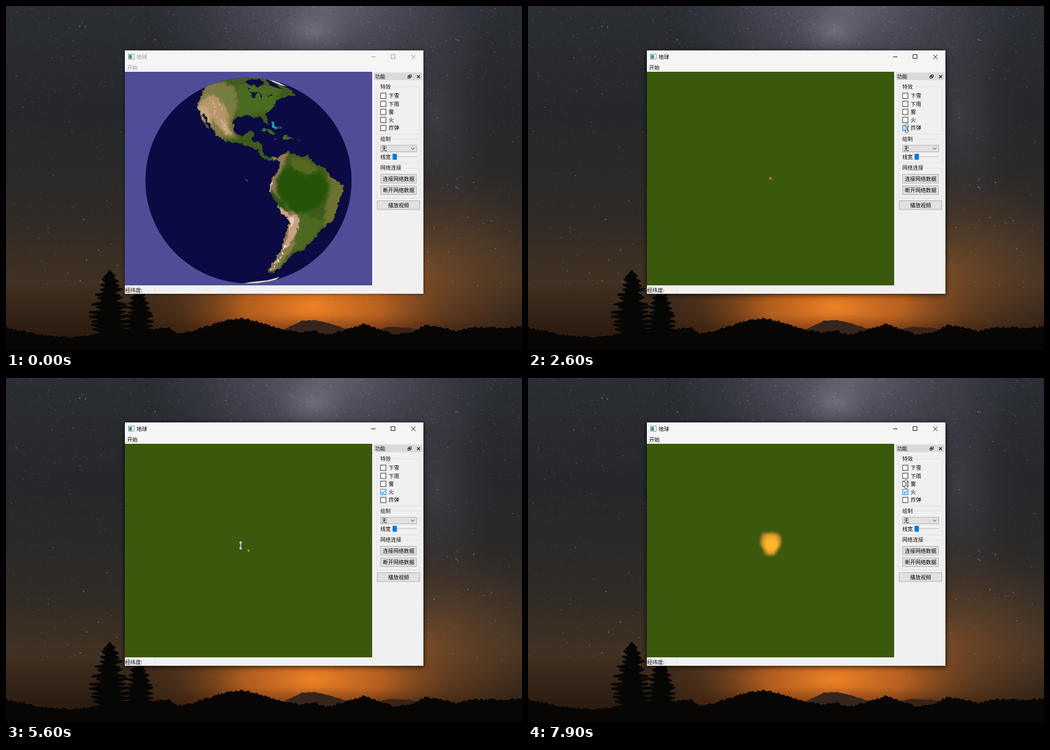
Write an HTML page with a canvas that moves like this. It is 916 px wide and 612 px high and loops after 8 s.

```html
<!DOCTYPE html>
<html lang="zh-CN">
<head>
<meta charset="utf-8">
<title>地球</title>
<style>
html, body { margin: 0; width: 100%; height: 100%; overflow: hidden; background: #222; }
canvas, svg { position: absolute; left: 0; top: 0; width: 916px; height: 612px; }
text { font: 9.33px "Noto Sans CJK SC", "Noto Sans CJK", sans-serif; fill: #111; }
.thin { font-weight: 300; fill: #000; }
.head { font-weight: 300; paint-order: stroke; stroke: #f0f0f0; stroke-width: 5px; }
.mid { text-anchor: middle; }
.btn { fill: #e1e1e1; stroke: #adadad; }
.frame { fill: none; stroke: #dedede; }
.box { fill: #fff; stroke: #333; }
.tick { fill: none; stroke: #0078d7; stroke-width: 1.2; }
.soft { filter: blur(2px); }

.anim { animation: 8s step-end infinite; }
.focus-text { animation-name: focusText; }
.focus-line { animation-name: focusLine; }
.focus-shade { animation-name: focusShade; }
.ground { animation-name: ground; }
.bomb-box { animation-name: bombBox; }
.bomb-tick { animation-name: bombTick; }
.fire-box { animation-name: fireBox; }
.fire-tick { animation-name: fireTick; }
.blast { animation-name: blast; }
.flame { animation-name: flame; }
.cursor { animation-name: cursor; }

@keyframes focusText { 0% { fill: #999 } 23.75%, 100% { fill: #000 } }
@keyframes focusLine { 0% { stroke: #999 } 23.75%, 100% { stroke: #111 } }
@keyframes focusShade { 0% { opacity: 0 } 23.75%, 100% { opacity: .38 } }
@keyframes ground { 0% { opacity: 0 } 32.5%, 100% { opacity: 1 } }
@keyframes bombBox {
  0% { fill: #fff; stroke: #333 }
  26.25% { fill: #fff; stroke: #0078d7 }
  31.25% { fill: #cce4f7; stroke: #0078d7 }
  33.75% { fill: #fff; stroke: #0078d7 }
  48.75% { fill: #cce4f7; stroke: #0078d7 }
  50% { fill: #fff; stroke: #0078d7 }
  52.5%, 100% { fill: #fff; stroke: #333 }
}
@keyframes bombTick { 0% { opacity: 0 } 33.75% { opacity: 1 } 50%, 100% { opacity: 0 } }
@keyframes fireBox {
  0% { fill: #fff; stroke: #333 }
  52.5% { fill: #fff; stroke: #0078d7 }
  55% { fill: #cce4f7; stroke: #0078d7 }
  56.25%, 100% { fill: #fff; stroke: #0078d7 }
}
@keyframes fireTick { 0% { opacity: 0 } 56.25%, 100% { opacity: 1 } }
@keyframes blast {
  0% { opacity: 0; transform: translate(430.5px, 306.5px) scale(.15) }
  32.5% { opacity: .6; transform: translate(430.5px, 306.5px) scale(.15); animation-timing-function: steps(5) }
  38.75% { opacity: .9; transform: translate(430.5px, 305.5px) scale(.28); animation-timing-function: steps(5) }
  45% { opacity: 1; transform: translate(430.8px, 303px) scale(.56); animation-timing-function: steps(4) }
  50%, 100% { opacity: 0; transform: translate(431px, 301.5px) scale(.72) }
}
@keyframes flame {
  0% { opacity: 0; transform: translate(430.5px, 307px) scale(.07) }
  57.5% { opacity: .7; transform: translate(430.5px, 307px) scale(.07); animation-timing-function: steps(10) }
  70% { opacity: .8; transform: translate(430.5px, 307px) scale(.1); animation-timing-function: steps(9) }
  81.25% { opacity: 1; transform: translate(430.6px, 305.6px) scale(.24); animation-timing-function: steps(5) }
  87.5% { opacity: 1; transform: translate(430.8px, 300px) scale(.68); animation-timing-function: steps(9) }
  98.75%, 100% { opacity: 1; transform: translate(431px, 294px) scale(1) }
}
@keyframes cursor {
  0% { opacity: 0; transform: translate(894.5px, 112px) }
  3.75% { opacity: 1; transform: translate(894.5px, 112px); animation-timing-function: steps(4) }
  8.75% { opacity: 1; transform: translate(730px, 160px); animation-timing-function: steps(4) }
  13.75% { opacity: 1; transform: translate(674.5px, 184px) }
  15% { opacity: 1; transform: translate(674.5px, 198px) }
  17.5% { opacity: 1; transform: translate(674.5px, 203px); animation-timing-function: steps(3) }
  21.25% { opacity: 1; transform: translate(675.5px, 224px) }
  26.25% { opacity: 1; transform: translate(674px, 221px); animation-timing-function: steps(2) }
  28.75% { opacity: 1; transform: translate(672.5px, 218px) }
  50% { opacity: 1; transform: translate(672.5px, 218px); animation-timing-function: steps(2) }
  52.5% { opacity: 1; transform: translate(672px, 202px) }
  61.25% { opacity: 1; transform: translate(672px, 202px) }
  62.5% { opacity: 1; transform: translate(630px, 225px); animation-timing-function: steps(2) }
  65% { opacity: 1; transform: translate(493px, 300px) }
  66.25% { opacity: 1; transform: translate(430px, 306px) }
  67.5% { opacity: 1; transform: translate(400px, 306px); animation-timing-function: steps(2) }
  70% { opacity: 1; transform: translate(416.5px, 298px); animation-timing-function: steps(5) }
  76.25% { opacity: 1; transform: translate(453px, 312.5px) }
  87.5% { opacity: 1; transform: translate(453px, 312.5px); animation-timing-function: steps(7) }
  96.25%, 100% { opacity: 1; transform: translate(671px, 189px) }
}
</style>
</head>
<body>
<canvas id="sky" width="916" height="612"></canvas>
<svg viewBox="0 0 916 612">
  <defs>
    <filter id="rough" x="-5%" y="-5%" width="110%" height="110%" color-interpolation-filters="sRGB">
      <feTurbulence type="fractalNoise" baseFrequency=".13" numOctaves="3" seed="4"/>
      <feDisplacementMap in="SourceGraphic" scale="9" xChannelSelector="R" yChannelSelector="G"/>
    </filter>
    <clipPath id="view"><rect x="211" y="117" width="439" height="380"/></clipPath>
    <clipPath id="disc"><circle cx="430.5" cy="310.5" r="183"/></clipPath>
    <path id="north" d="M354 141 375 132 400 126 450 125 480 133 495 143 507 151 514 160 503 158 497 163 488 163 480 168 475 180 468 186 460 194 463 200 466 212 461 209 455 199 440 198 430 196 415 197 405 202 403 213 405 225 412 229 421 231 428 226 432 222 441 224 439 232 435 238 441 243 452 244 456 250 457 262 462 268 470 270 478 268 484 271 474 276 466 275 458 271 452 268 447 257 436 251 424 248 413 243 400 243 385 238 374 231 370 222 362 212 356 198 350 189 348 194 354 206 361 219 355 214 349 204 344 191 340 180 341 170 347 160 352 151Z"/>
    <path id="south" d="M482 272 486 265 493 262 500 259 506 262 512 263 522 267 532 265 541 272 552 284 566 288 572 298 578 306 592 313 599 325 598 336 588 352 586 368 580 383 568 392 558 399 550 412 541 421 528 434 515 438 508 443 500 451 494 458 488 464 480 471 475 476 465 475 466 468 472 461 480 448 487 436 492 420 497 404 503 386 500 377 488 368 482 355 474 340 467 330 470 320 471 308 478 300 486 288 485 277Z"/>
    <clipPath id="land"><use href="#north"/><use href="#south"/></clipPath>
    <path id="tick" class="tick" d="M2 5.2 4.2 7.5 8.5 2.6"/>
  </defs>

  <rect x="211" y="80" width="530" height="432" opacity=".55" style="filter:blur(3px)"/>
  <rect class="anim focus-shade" x="210" y="82" width="532" height="434" style="filter:blur(5px)"/>
  <rect x="211" y="79" width="530" height="433" fill="#f0f0f0"/>
  <rect x="211" y="79.5" width="530" height="37.5" fill="#f5f5f5"/>

  <rect x="217.5" y="85.5" width="10" height="9" fill="#fff" stroke="#8a8f92"/>
  <rect x="218.5" y="87" width="5" height="6.5" fill="#3c8a80"/>
  <text class="anim focus-text" x="231.8" y="93.6">地球</text>
  <text class="anim focus-text" x="215" y="113.3">开始</text>
  <path class="anim focus-line" fill="none" d="M648 90.5h8M683.5 86.5h7v7h-7zM719.5 86.5l7.5 8M727 86.5l-7.5 8"/>

  <g clip-path="url(#view)">
    <rect x="211" y="117" width="439" height="380" fill="#4f4d98"/>
    <circle cx="430.5" cy="310.5" r="183" fill="#0b0a42"/>
    <g clip-path="url(#disc)">
      <g filter="url(#rough)">
        <g fill="#3f5a1c"><use href="#north"/><use href="#south"/></g>
        <g clip-path="url(#land)">
          <g class="soft">
            <path fill="#7d7a42" d="M340 135h45l22 10 5 35-10 20 2 25 10 10-35 5-45-60z"/>
            <path fill="#4c6b22" d="M412 140h80l-20 45-60 12z"/>
            <path fill="#475c24" d="M385 124h110v20l-90-6z"/>
            <path fill="#b6966a" d="M342 172l18-14 14 2 10 12 8 12 4 20-8 20-14-12-14-22-12-10z"/>
            <path fill="#c9a77c" d="M340 176l16 6 8 14 0 24-20-24zM376 200l14 6 12 24-12-2z"/>
            <path fill="#6f8040" d="M376 158l22-8 8 14-16 12z"/>
            <path fill="#2e5a14" d="M376 232l40 12 46 24 20 4v6h-30l-40-28z"/>
            <ellipse cx="520" cy="325" rx="50" ry="42" fill="#255409"/>
            <path fill="#58691f" d="M505 268l35 8 14 16-20 10-26-14z"/>
            <path fill="#6d7130" d="M568 290l32 25 0 30-16 36-22 14 6-40 8-34z"/>
            <path fill="#4b6a20" d="M520 368l46 14-18 30-28 24-20-4z"/>
            <path fill="#927a55" d="M500 262l-8 24-12 24 0 20 22 34 18 8-4 30-16 34-20 32-16 4 6-18 26-60 6-36-24-22-18-28 14-42 12-24z"/>
            <path fill="#8a7a4b" d="M506 416l10 6-22 30-18 22-6-8z"/>
          </g>
          <path fill="#c9a184" d="M484 354l18 16 18 4 2 10-8 22-14 22-6 8 6-26 5-24-16-14z"/>
          <path fill="#ead0b8" d="M470 305l3 14-4 12-4-4zM504 374l8 4-8 20z"/>
          <path fill="none" stroke="#efeee6" stroke-width="2" stroke-dasharray="5 2 3 4" d="M496 426l-9 22-10 14-8 9"/>
          <path fill="none" stroke="#d8bd98" stroke-width="2" stroke-dasharray="3 5 7 4" d="M362 162l10 16-2 12 14 16 6 16M376 164l8 20"/>
        </g>
        <g fill="#0b0a42">
          <path d="M421 136l12-6 18 1 9 6-9 3-3 6-6-5-12-1z"/>
          <path d="M462 131l20 8 8 10-10-2-12-8z"/>
          <path d="M433 155l10-3 8 3-7 2-4 8-3-1 1-7zM450 157l6 4-6 3zM463 159l12-3-4 4zM428 144l7 4-3 1z"/>
        </g>
        <path fill="#42642a" d="M450 221l8-4 12 4 12 6-9 0-12-5zM489 232l10-2 11 6-10 2-10-1zM475 235l7 1-4 2zM515 237l6 0-1 2zM424 308l6 1-1 3-4-1z"/>
        <path fill="#19a3ad" d="M470 207l6 1 2 6 6 3-4 3-8-3zM484 214l4 3-2 2zM456 217l5 0-2 2z"/>
      </g>
      <path fill="#ddd9d2" d="M466 129l33 14-11-2-16-7zM404 496l32-5 28-3 22-6-20 14z"/>
    </g>
    <rect class="anim ground" x="211" y="117" width="439" height="380" fill="#3b590d"/>
    <g class="anim blast">
      <g style="filter:blur(2.5px)">
        <path fill="#c77a1c" d="M-4-19l14 2 9 12-1 13-10 11-14-1-12-11 1-15z"/>
        <circle cx="-1" cy="0" r="13" fill="#ff9823"/>
      </g>
    </g>
    <g class="anim flame">
      <g class="soft">
        <path fill="#b98325" d="M-14-19l8 1 6-2 8 1 8 4 3 9-1 10-6 9-5 8-10 1-8-3-3-9-5-8 1-11z"/>
        <path fill="#e9a32b" d="M-10-14l9-2 11 2 6 10-3 12-7 10-10 1-7-9-4-10z"/>
        <circle cx="1" cy="2" r="11.5" fill="#ffb52c"/>
      </g>
    </g>
  </g>

  <rect x="653" y="118.5" width="86.5" height="13.5" fill="#dadada"/>
  <text x="655" y="129">功能</text>
  <path fill="none" stroke="#222" d="M715.5 122.5h4v4h-4zM713.5 124.5h4v4h-4zM713.5 125h4"/>
  <path stroke="#222" stroke-width="1.4" d="M729.8 123.2l5 5M734.8 123.2l-5 5"/>

  <path class="frame" d="M658.5 143.5h76.5v84.5h-76.5zM658.5 236.5h76.5v42.5h-76.5zM658.5 288.5h76.5v53h-76.5z"/>
  <text class="head" x="664.5" y="146.6">特效</text>
  <text class="head" x="664.5" y="240">绘制</text>
  <text class="head" x="664.5" y="291">网络连接</text>

  <rect class="box" x="665" y="155" width="9.5" height="9.5"/>
  <rect class="box" x="665" y="169.3" width="9.5" height="9.5"/>
  <rect class="box" x="665" y="183.6" width="9.5" height="9.5"/>
  <rect class="box anim fire-box" x="665" y="198" width="9.5" height="9.5"/>
  <rect class="box anim bomb-box" x="665" y="212.3" width="9.5" height="9.5"/>
  <use class="anim fire-tick" href="#tick" x="664.5" y="197.7"/>
  <use class="anim bomb-tick" href="#tick" x="664.5" y="212"/>
  <g class="thin">
    <text class="thin" x="679.3" y="163.2">下雪</text>
    <text class="thin" x="679.3" y="177.5">下雨</text>
    <text class="thin" x="679.3" y="191.8">雾</text>
    <text class="thin" x="679.3" y="206.1">火</text>
    <text class="thin" x="679.3" y="220.4">炸弹</text>
  </g>

  <rect class="btn" x="665" y="247.8" width="64" height="11.7"/>
  <text class="thin" x="667" y="257">无</text>
  <path fill="none" stroke="#333" d="M719 252l3 3 3-3"/>
  <text class="thin" x="664.5" y="271.8">线宽</text>
  <path stroke="#d6d6d6" stroke-width="2" d="M686 268h43.5"/>
  <rect x="686.3" y="263" width="7.5" height="10.5" fill="#0078d7"/>

  <rect class="btn" x="665" y="299.5" width="63.5" height="15.5"/>
  <rect class="btn" x="665" y="320" width="63.5" height="15.5"/>
  <rect class="btn" x="659" y="346.5" width="75.5" height="15.5"/>
  <text class="thin mid" x="697" y="310.7">连接网络数据</text>
  <text class="thin mid" x="697" y="331.2">断开网络数据</text>
  <text class="thin mid" x="697" y="357.7">播放视频</text>

  <path stroke="#e2e2e2" d="M264.5 499v12"/>
  <text x="211.5" y="508.5">经纬度:</text>

  <path class="anim cursor" fill="#fff" stroke="#222" stroke-width=".8" d="M0-8.5 3.7-4H1.2V4H3.7L0 8.5-3.7 4H-1.2V-4H-3.7Z"/>
</svg>
<script>
const W = 916, H = 612;
const g = document.getElementById('sky').getContext('2d');
let seed = 7;
const rnd = () => (seed = (seed * 16807) % 2147483647) / 2147483647;

function glow(x, y, rx, ry, ...stops) {
  const fill = g.createRadialGradient(0, 0, 0, 0, 0, 1);
  stops.forEach((c, i) => fill.addColorStop(i / (stops.length - 1), c));
  g.save();
  g.translate(x, y);
  g.scale(rx, ry);
  g.fillStyle = fill;
  g.fillRect(-1, -1, 2, 2);
  g.restore();
}

function ridge(color, rough, pts) {
  g.fillStyle = color;
  g.beginPath();
  g.moveTo(pts[0][0], H);
  for (let i = 1; i < pts.length; i++) {
    const [x0, y0] = pts[i - 1], [x1, y1] = pts[i];
    for (let x = x0; x < x1; x += 2.5)
      g.lineTo(x, y0 + (y1 - y0) * (x - x0) / (x1 - x0) + (rnd() - .5) * rough);
  }
  g.lineTo(pts[pts.length - 1][0], H);
  g.fill();
}

function pine(x, top, base, half) {
  g.fillStyle = g.strokeStyle = '#060605';
  g.lineWidth = 3;
  g.lineJoin = 'round';
  g.fillRect(x - 2, top, 4, base - top);
  for (let y = top + 8; y < base; y += 8) {
    const w = half * Math.pow((y - top) / (base - top), .55);
    for (const side of [-1, 1]) {
      const tip = x + side * w * (.65 + .35 * rnd());
      g.beginPath();
      g.moveTo(x, y - 7);
      g.lineTo((x + tip) / 2, y - 1 + rnd() * 3);
      g.lineTo(tip, y + rnd() * 5);
      g.lineTo((x + tip) / 2, y + 6);
      g.lineTo(x, y + 5);
      g.fill();
      g.stroke();
    }
  }
}

const sky = g.createLinearGradient(0, 0, 0, H);
[[0, '#2b2e34'], [.3, '#25272b'], [.62, '#2f2b27'], [.8, '#403122'], [.95, '#2c1c10']]
  .forEach(s => sky.addColorStop(...s));
g.fillStyle = sky;
g.fillRect(0, 0, W, H);

glow(570, 0, 320, 210, 'rgba(125,120,140,.7)', 'rgba(100,97,115,.4)', 'rgba(70,70,85,0)');
glow(545, 45, 70, 45, 'rgba(160,152,170,.4)', 'rgba(120,115,130,0)');
glow(765, 190, 110, 230, 'rgba(90,85,98,.45)', 'rgba(60,58,66,0)');
glow(740, 470, 300, 190, 'rgba(150,95,50,.6)', 'rgba(110,72,42,.35)', 'rgba(70,50,40,0)');
glow(545, 535, 370, 150, 'rgba(240,130,38,1)', 'rgba(215,110,32,.75)', 'rgba(130,70,26,.25)', 'rgba(70,40,20,0)');
glow(545, 600, 420, 50, 'rgba(95,38,10,.75)', 'rgba(60,25,8,0)');

// specks, denser and lighter near the bright band
for (let i = 0; i < 5200; i++) {
  const x = rnd() * W, y = rnd() * 560;
  const band = Math.max(0, 1 - Math.hypot((x - 560) / 420, y / 230));
  const dark = rnd() < .45;
  const a = (dark ? .2 : .1 + .12 * band) * (.4 + rnd()) * (1 - y / 750);
  g.fillStyle = dark ? `rgba(8,9,12,${a})` : `rgba(205,205,220,${a})`;
  g.fillRect(x, y, 1 + rnd() * 1.6, 1 + rnd());
}
for (let i = 0; i < 330; i++) {
  const x = rnd() * W, y = rnd() * 500;
  g.strokeStyle = `rgba(205,205,215,${.15 + rnd() * .4})`;
  g.lineWidth = .9;
  g.beginPath();
  g.moveTo(x, y);
  g.lineTo(x + 1 + rnd() * 2, y + .5 + rnd() * 1.5);
  g.stroke();
}
const dot = color => ([x, y]) => glow(x, y, 3.2, 2.6, color, 'rgba(0,0,0,0)');
[[131, 36], [141, 37], [265, 60], [390, 40], [479, 44], [645, 66], [830, 314], [820, 376], [760, 394],
 [164, 434], [143, 452], [132, 489], [138, 380], [868, 432]].forEach(dot('#d39a3f'));
[[799, 60], [803, 61], [799, 322], [802, 324]].forEach(dot('#8f95e8'));

ridge('#3a2216', 1, [[640, 580], [680, 571], [715, 572], [750, 580]]);
ridge('#36251d', 1, [[480, 582], [500, 572], [525, 560], [550, 559], [575, 565], [600, 573], [640, 582]]);
ridge('#080605', 4, [
  [0, 572], [30, 578], [60, 585], [110, 589], [140, 587], [270, 574], [290, 572], [305, 583], [330, 578],
  [365, 567], [385, 561], [415, 555], [445, 561], [470, 569], [490, 576], [520, 580], [550, 578], [570, 585],
  [600, 577], [635, 566], [660, 574], [690, 584], [720, 580], [745, 568], [775, 572], [800, 578],
  [830, 571], [870, 573], [920, 570]]);
pine(184, 470, 592, 48);
pine(236, 502, 592, 38);
</script>
</body>
</html>
```
